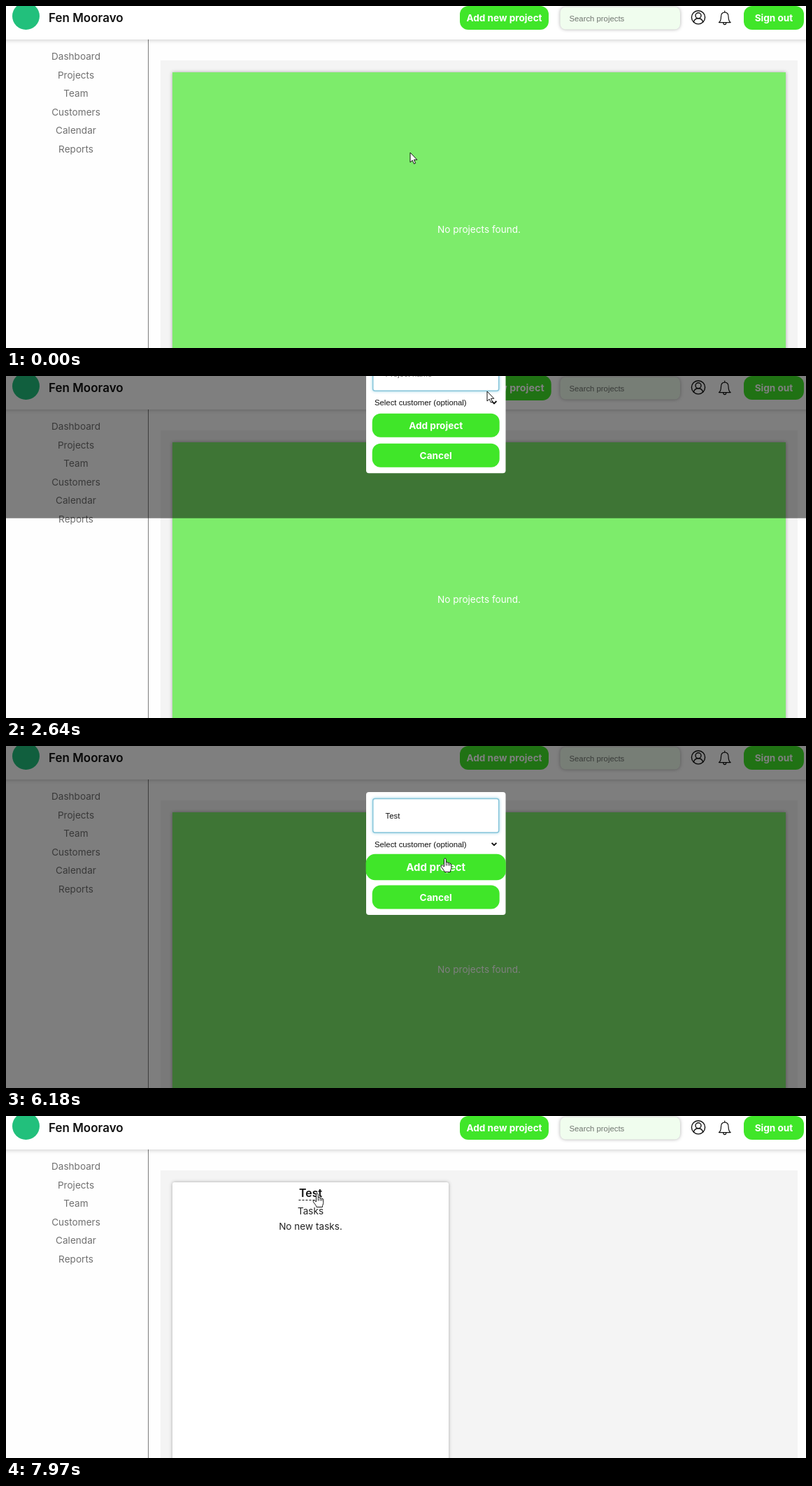
Write an HTML page that moves like this. It is 1144 px wide and 490 px high and loops after 8 s.

```html
<!DOCTYPE html>
<html lang="en">
<head>
<meta charset="utf-8">
<title>Add a project</title>
<style>
  html, body { margin: 0; width: 100%; height: 100%; overflow: hidden; background: #fff; }
  svg { display: block; width: 100%; height: 100%; }
  text { font: 13.6px Inter, sans-serif; white-space: pre; }
  .mid { text-anchor: middle; }
  .bold { font-weight: 700; fill: #fff; }
  .form { font: 11.33px "Liberation Sans", Arial, sans-serif; }
  .soft { filter: drop-shadow(0 0 2.5px rgba(0, 0, 0, .32)); }
  .head { filter: drop-shadow(0 1px 3px rgba(0, 0, 0, .2)); }
  .line { fill: none; stroke: #111; stroke-width: 1.4; stroke-linecap: round; stroke-linejoin: round; }
</style>
</head>
<body>
<svg id="stage" viewBox="0 0 1144 490"></svg>
<script>
const LOOP = 8000, SLIDE = 300;
const OPEN = 2565, CLOSE = 6302, GONE = 6525, LINK_HOVER = 7887;
const GREEN = '#40e629';

const label = (x, y, s, cls = 'mid', fill = '#222', extra = '') =>
  `<text x="${x}" y="${y}" class="${cls}" fill="${fill}" ${extra}>${s}</text>`;

const box = (x, y, w, h, fill, r = 0, extra = '') =>
  `<rect x="${x}" y="${y}" width="${w}" height="${h}" rx="${r}" fill="${fill}" ${extra}/>`;

const button = (id, cx, cy, w, s) =>
  `<g id="${id}">${box(cx - w / 2, cy - 17, w, 34, GREEN, 12)}${label(cx, cy + 5, s, 'mid bold')}</g>`;

const menu = ['Dashboard', 'Projects', 'Team', 'Customers', 'Calendar', 'Reports']
  .map((s, i) => label(100, 77 + 26.5 * i, s, 'mid', '#707070')).join('');

const page = `
  ${box(0, 0, 1144, 490, '#fefefe')}
  ${box(203, 48, 1, 442, '#7c7c7c')}
  ${menu}
  ${box(221, 78, 911, 420, '#f4f4f4')}
  <g id="empty">
    ${box(238, 95, 877, 420, '#7dec6b', 0, 'class="soft"')}
    ${label(676.5, 325, 'No projects found.', 'mid', '#fff')}
  </g>
  <g id="card">
    ${box(238, 95, 395, 420, '#fff', 3, 'class="soft"')}
    <g id="link">
      ${label(435.5, 116, 'Test', 'mid', 'currentColor', 'style="font-size:16px;font-weight:600"')}
      <path d="M418.5 120.5h34" stroke="currentColor" stroke-dasharray="3 2"/>
    </g>
    ${label(435.5, 141, 'Tasks')}
    ${label(435.5, 163, 'No new tasks.')}
  </g>`;

// The dialog shrinks to its content while it leaves, behind the header.
const leaving = `
  <g id="leaving">
    ${box(515, 66, 200, 176, '#fff', 4, 'class="soft"')}
    ${button('', 615, 173.5, 112, 'Add project')}
    ${button('', 615, 216.5, 86, 'Cancel')}
  </g>`;

const header = `
  ${box(-10, -10, 1164, 58, '#fff', 0, 'class="head"')}
  <circle cx="28.5" cy="14.5" r="19.5" fill="#22c07c"/>
  ${label(61, 23, 'Fen Mooravo', '', '#111', 'style="font-size:17px;font-weight:600"')}
  ${button('addNew', 712.5, 17, 127, 'Add new project')}
  ${box(792.5, 1.5, 171.5, 32, '#f0fdee', 8, 'class="soft"')}
  ${label(805.5, 21.5, 'Search projects', 'form', '#707570')}
  <g class="line">
    <circle cx="990" cy="16.3" r="9.6"/>
    <circle cx="990" cy="13.7" r="4"/>
    <path d="M983.4 23c.8-3.4 3.4-5.2 6.6-5.2s5.8 1.8 6.6 5.2"/>
    <path d="M1019.5 23.6c2.6-2 3-3.8 3-8.2 0-4 2.2-6.3 5.3-6.3s5.3 2.3 5.3 6.3c0 4.4.4 6.2 3 8.2zM1027.8 9v-1.8M1025.8 24c.2 3.6 3.8 3.6 4 0" stroke-width="1.2"/>
  </g>
  ${button('', 1098, 17, 86, 'Sign out')}`;

const dialog = `
  <g id="dialog">
    ${box(515, 66, 199.5, 176, '#fff', 4)}
    ${box(524.7, 75.5, 180, 48.5, '#fff', 3, 'stroke="#86c5da" stroke-width="1.5" style="filter:drop-shadow(0 0 2px #9bd3e5)"')}
    ${label(542.5, 103.5, '', 'form', '', 'id="field"')}
    ${label(527, 144.7, 'Select customer (optional)', 'form', '#111')}
    <path d="M694.6 138.8l3.4 3.4 3.4-3.4" fill="none" stroke="#111" stroke-width="1.9"/>
    ${button('add', 614.7, 173.5, 182, 'Add project')}
    ${button('', 614.7, 216.5, 182, 'Cancel')}
  </g>`;

const cursors = `
  <g id="pointer" fill="#fff" stroke="#111" stroke-linejoin="round">
    <path id="arrow" d="M0 0V14L3.2 11.1 5.5 16.1 7.6 15.2 5.4 10.3H9.8Z"/>
    <path id="hand" d="M-1.5 1.3C-1.5-.4 1.3-.4 1.3 1.3V6.4C2-.1+5 4.6 5.4 4.6 7.1 5.2 5.5 7.2 6 7.2 7.6 8.8 7 8.8 8.5 8.8 10.2V13.5C8.8 15.5 7.4 16.6 7.4 19.5H-.8C-1.2 16.8-5.2 13.6-5.7 11.5-6.2 9.7-4 9-2.8 10.6L-1.5 12ZM1.4 6.8V10.5M4.1 7V10.5M6.5 8V10.5"/>
    <path id="beam" d="M-3-6.5h2.2L0-6l.8-.5H3M0-6V6M-3 6.5h2.2L0 6l.8.5H3" fill="none" stroke-width="1.3"/>
  </g>`;

const stage = document.getElementById('stage');
stage.innerHTML = page + leaving + header +
  `<rect id="shade" width="1144" height="490" fill="#000" fill-opacity=".5"/>` + dialog + cursors;

const $ = id => document.getElementById(id);
$('hand').setAttribute('d',
  'M-1.5 1.3C-1.5-.4 1.3-.4 1.3 1.3V6.4C1.8 5 4.2 5.1 4.2 7 4.8 5.6 6.6 6 6.6 7.7 7.4 6.9 8.8 7.4 8.8 9' +
  'V13.5C8.8 15.5 7.4 16.6 7.4 19.5H-.8C-1.2 16.8-5.2 13.6-5.7 11.5-6.2 9.7-4 9-2.8 10.6L-1.5 12Z' +
  'M1.4 6.8V10.5M4.2 7V10.5M6.6 8V10.5');

const path = [
  [900, 578, 210], [1150, 602, 198], [1400, 635, 142], [1740, 685.5, 35],
  [1930, 685.5, 35], [2100, 688, 22], [2750, 688, 22], [3230, 625, 104],
  [3510, 621, 107], [5110, 621, 107], [5450, 636, 162], [5650, 638, 192],
  [6020, 628, 161], [6180, 628, 161], [6320, 627, 160.5], [7150, 627, 160.5], [7950, 445, 111]
];

const typed = [[3990, 'T'], [4390, 'Te'], [4590, 'Tes'], [4740, 'Test']];

function pointerAt(t) {
  const i = path.findIndex(p => p[0] > t);
  if (i === 0) return path[0].slice(1);
  if (i < 0) return path[path.length - 1].slice(1);
  const a = path[i - 1], b = path[i], k = (t - a[0]) / (b[0] - a[0]);
  return [a[1] + (b[1] - a[1]) * k, a[2] + (b[2] - a[2]) * k];
}

// CSS "ease": cubic-bezier(.25, .1, .25, 1)
function ease(x) {
  if (x <= 0) return 0;
  if (x >= 1) return 1;
  const curve = (u, a, b) => 3 * a * u * (1 - u) ** 2 + 3 * b * u * u * (1 - u) + u ** 3;
  let lo = 0, hi = 1;
  for (let i = 0; i < 24; i++) {
    const u = (lo + hi) / 2;
    if (curve(u, .25, .25) < x) lo = u; else hi = u;
  }
  return curve(lo, .1, 1);
}

const hoverScale = (t, on, off) => 1 + .1 * (ease((t - on) / SLIDE) - ease((t - off) / SLIDE));
const show = (id, on) => $(id).style.display = on ? '' : 'none';
const move = (id, y) => $(id).setAttribute('transform', `translate(0 ${y})`);
const grow = (id, cx, cy, k) =>
  $(id).setAttribute('transform', `translate(${cx} ${cy}) scale(${k}) translate(${-cx} ${-cy})`);

function draw(t) {
  const opening = t >= OPEN && t < CLOSE, closing = t >= CLOSE && t < GONE;
  const enter = ease((t - OPEN) / SLIDE), leave = ease((t - CLOSE) / SLIDE);

  show('empty', t < CLOSE);
  show('card', t >= CLOSE);
  show('shade', opening || closing);
  show('dialog', opening);
  show('leaving', closing);
  move('shade', -490 * (opening ? 1 - enter : leave));
  move('dialog', -176 * (1 - enter));
  move('leaving', -344 * leave);

  grow('addNew', 712.5, 17, hoverScale(t, 1960, OPEN));
  grow('add', 614.7, 173.5, hoverScale(t, 5420, CLOSE));
  $('link').style.color = t >= LINK_HOVER ? '#111' : GREEN;

  const entry = typed.filter(e => e[0] <= t).pop();
  $('field').textContent = entry ? entry[1] : 'Project name';
  $('field').setAttribute('fill', entry ? '#111' : '#757575');

  const [x, y] = pointerAt(t);
  const beam = opening && t > 2900 && y > 75 && y < 124;
  const hand = (t >= 1960 && t < OPEN) || (t >= 5420 && t < CLOSE) || t >= LINK_HOVER;
  show('beam', beam);
  show('hand', hand && !beam);
  show('arrow', !hand && !beam);
  $('pointer').setAttribute('transform', `translate(${x} ${y})`);
}

function tick() {
  draw(performance.now() % LOOP);
  requestAnimationFrame(tick);
}
tick();
</script>
</body>
</html>
```
